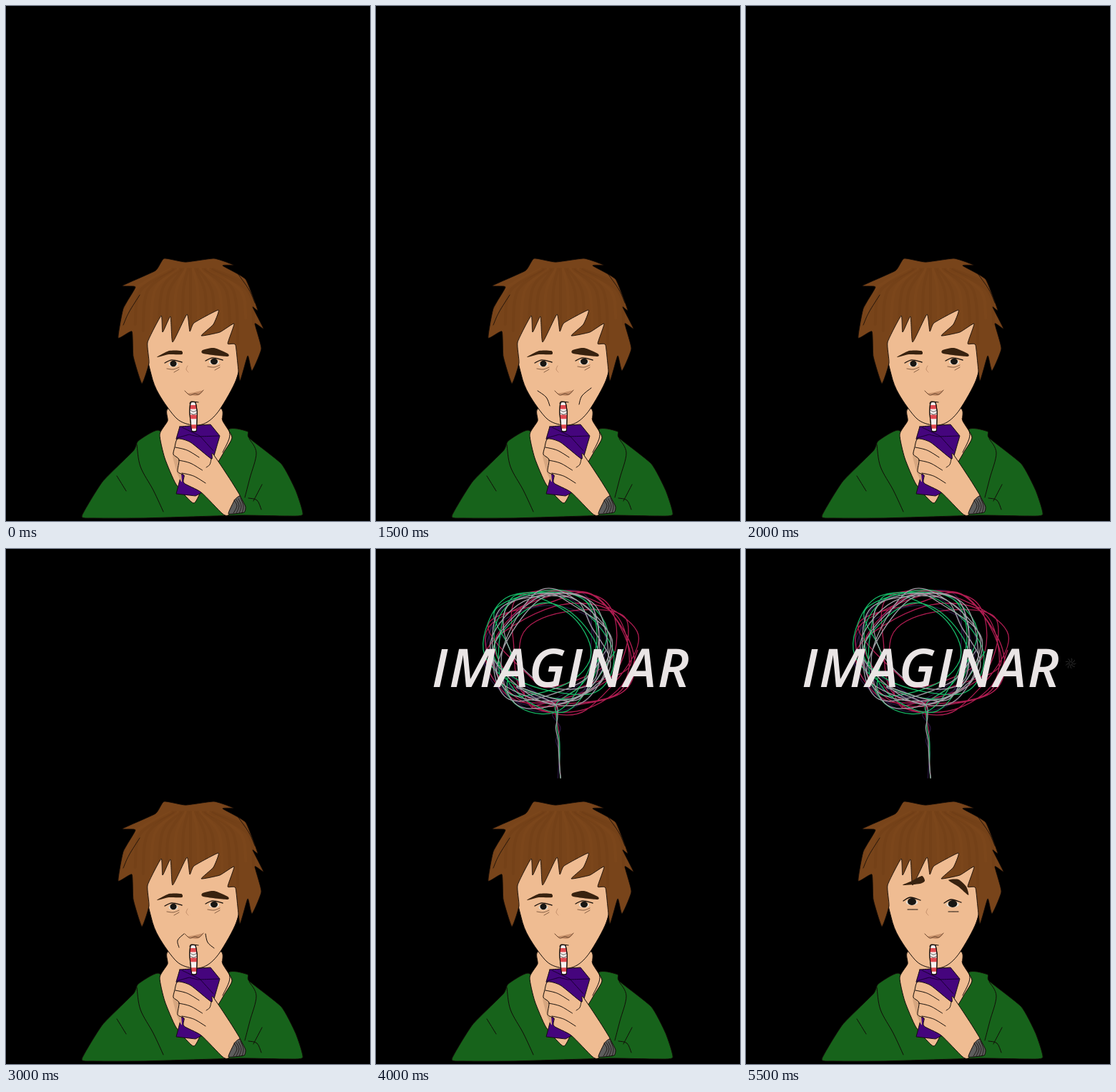
Animation, 509 px wide and 720 px high, one loop 6500 ms. Source, as an HTML page with a canvas:

```html
<!DOCTYPE html>
<html lang="es">
<head>
<meta charset="utf-8">
<title>Imaginar</title>
<style>
html, body { margin: 0; width: 100%; height: 100%; overflow: hidden; background: #000; }
canvas { display: block; width: 509px; height: 720px; }
</style>
</head>
<body>
<canvas id="stage" width="509" height="720" role="img" aria-label="IMAGINAR"></canvas>
<script>
const ctx = document.getElementById('stage').getContext('2d');
const BEAT = 500, LOOP = 13 * BEAT;
const SKIN = '#efbc92', SHADE = '#d6a67f', GREEN = '#17631b', HAIR = '#78441a',
  PURPLE = '#45057d', FOLD = '#17002f', RED = '#e04a50', WHITE = '#f6f0ee',
  BROW = '#38220f', INK = '#120c08';

// He sips for six beats, blows, then has the idea and wakes up
function sceneAt(t) {
  const beat = Math.floor(t / BEAT);
  return {
    cheeks: beat < 6 ? (beat % 2 ? 'in' : '') : beat < 8 ? 'out' : '',
    thought: beat >= 8,
    awake: beat >= 9,
    lowered: beat === 9 || beat === 10,
    spark: beat >= 11
  };
}

function seeded(seed) {
  return () => (seed = seed * 16807 % 2147483647) / 2147483647;
}

const parse = s => s.trim().split(/\s+/).map(p => p.split(',').map(Number));

// Smooth path through points; tension 0 gives straight segments
function trace(pts, tension = 1, close = false) {
  const p = typeof pts === 'string' ? parse(pts) : pts, n = p.length, path = new Path2D();
  const at = i => close ? p[(i + n) % n] : p[Math.max(0, Math.min(n - 1, i))];
  path.moveTo(...p[0]);
  for (let i = 0; i < n - (close ? 0 : 1); i++) {
    const a = at(i - 1), b = at(i), c = at(i + 1), d = at(i + 2), k = tension / 6;
    path.bezierCurveTo(b[0] + (c[0] - a[0]) * k, b[1] + (c[1] - a[1]) * k,
      c[0] - (d[0] - b[0]) * k, c[1] - (d[1] - b[1]) * k, c[0], c[1]);
  }
  if (close) path.closePath();
  return path;
}

function stroke(path, width, color) {
  ctx.lineWidth = width;
  ctx.strokeStyle = color;
  ctx.stroke(path);
}

function ink(pts, width = 1, color = INK, tension = 1) {
  stroke(trace(pts, tension), width, color);
}

function shape(pts, color, tension = 0, edge = 1) {
  const path = trace(pts, tension, true);
  ctx.fillStyle = color;
  ctx.fill(path);
  if (edge) stroke(path, edge, INK);
  return path;
}

function oval(x, y, rx, ry, color) {
  ctx.fillStyle = color;
  ctx.beginPath();
  ctx.ellipse(x, y, rx, ry, 0, 0, 7);
  ctx.fill();
}

function drawBody() {
  shape(`106,713 135,665 178,622 185,608 213,593 250,620 313,591 338,595 340,604
    385,640 405,677 415,711 390,713 330,712 260,714 190,716 122,716`, GREEN, .5);
  shape(`228,562 226,580 215,599 222,632 238,669 262,695 274,676 304,625 316,603
    303,580 299,562`, SKIN, .6);
  ink('183,613 188,644 206,677 220,707');
  ink('340,605 350,625 341,660 334,687');
  ink('155,657 168,678');
  ink('358,669 346,692');
  ink('339,688 351,691 357,704');
  ink('302,577 313,599 303,624');
}

function drawFace(cheeks) {
  shape(`215,405 197,472 203,515 214,543 239,577 262,586 281,582 299,564 322,522
    325,490 312,405`, SKIN, .9);
  if (cheeks === 'in') {
    ink('226,538 238,547 243,559');
    ink('301,534 288,545 284,557');
  }
  if (cheeks === 'out') {
    ink('249,538 240,547 242,557');
    ink('279,538 282,550 291,558');
  }
}

function drawHair() {
  const hair = shape(`190,528 178,490 176,455 157,464 164,423 181,393 163,391 209,370
    221,353 251,358 291,353 318,362 303,363 335,382 352,425 345,421 360,451 348,444
    357,479 344,510 338,489 327,524 321,474 310,472 319,444 299,456 273,461 290,445
    297,425 263,443 257,455 253,431 233,470 230,434 219,456 217,433 198,470 200,499`,
    HAIR, .45, .9);
  ctx.save();
  ctx.clip(hair);
  for (let i = 0; i < 18; i++) {
    const x = 178 + i * 10, lean = (x - 258) * .35;
    ink([[258 + lean, 368], [x, 398], [x + lean * .3, 436 + i % 5 * 9]],
      4, i % 3 ? 'rgba(82,40,12,.1)' : 'rgba(155,88,35,.09)');
  }
  ctx.restore();
  ink('187,404 172,428 164,446', .8);
  ink('324,374 340,397 348,415', .8);
}

function drawEye(x, y, size, awake) {
  const h = awake ? 5 : 4.2;
  oval(x, y + 1, size * 1.4, h * .8, '#e6dfd4');
  oval(x, y, size, h, '#171613');
  ink([[x - 12, y - 1], [x - 2, y - h - 1], [x + 12, y - 2]], 1.3);
  if (awake) {
    ink([[x - 6, y + 11], [x + 8, y + 11]]);
  } else {
    ink([[x - 9, y + 7], [x, y + 8], [x + 8, y + 5]], .8, '#67452e');
    ink([[x + 1, y + 12], [x + 8, y + 8]], .8, '#67452e');
  }
}

function drawEyes(awake) {
  if (awake) {
    shape('219,470 232,464 246,457 250,464 243,468', BROW, .7, 0);
    shape('283,463 297,462 308,472 311,484 297,472', BROW, .7, 0);
    drawEye(232, 493, 6, true);
    drawEye(289, 496, 6.3, true);
  } else {
    shape('211,491 228,482 245,482 246,487 228,487', BROW, .7, 0);
    shape('275,481 291,478 310,486 309,490 276,486', BROW, .7, 0);
    drawEye(234, 500, 4.6, false);
    drawEye(291, 497, 5, false);
  }
}

function drawNose() {
  ink('254,503 252,508 255,512', .8, '#b98562');
  shape('254,542 264,540 275,538 267,545', '#c58f69', .8, 0);
  ink('250,538 257,544 264,542 270,543 276,537', .9, '#583621');
}

function drawStraw(x0, x1, y0, y1) {
  const h = y1 - y0;
  ctx.save();
  ctx.translate(x0, y0);
  ctx.transform(1, 0, (x1 - x0) / h, 1, 0, 0);
  const side = [0, .3, .5, 1].map(k => [3.2 + 2 * Math.sin(Math.PI * k ** .6), h * k]);
  const mirror = side.map(([x, y]) => [-x, y]).reverse();
  const tube = shape([...side, ...mirror], WHITE, .4);
  ctx.save();
  ctx.clip(tube);
  ctx.fillStyle = RED;
  for (let i = 0; i < 3; i++) ctx.fillRect(-9, h * (.1 + i * .34), 18, h * .14);
  ctx.restore();
  stroke(tube, 1, INK);
  for (let i = 0; i < 2; i++) {
    const y = h * .28 + i * 4;
    ink([[-4, y], [0, y + 2], [5, y]], .8, '#333');
  }
  ctx.restore();
}

function drawBracelet() {
  shape('327,685 335,700 333,708 311,710 320,690', '#5d5d5d', .4);
  for (let i = 0; i < 4; i++)
    ink([[319 + i * 3, 691 - i], [323 + i * 3, 699], [318 + i * 4, 709]], .8);
}

function drawFingers(x, y, dx, dy, gap) {
  for (let i = 0; i < 3; i++) {
    const fx = x + i * gap / 4, fy = y + i * gap;
    ink([[fx, fy], [fx + dx * .5, fy + dy * .3], [fx + dx, fy + dy]]);
  }
}

function drawRaised() {
  shape('243,588 286,585 299,601 290,632 278,678 265,685 238,682 249,640 238,605', PURPLE);
  ink('239,604 256,599 268,602 298,601', 1, FOLD, 0);
  ink('246,589 271,601 290,622', 1, FOLD, 0);
  shape('237,607 233,628 239,652 246,665 241,620', SHADE, .6, 0);
  shape(`240,605 258,610 287,633 290,627 328,686 321,697 312,711 303,710 273,680
    249,667 249,656 240,651 242,634 234,627 236,617`, SKIN, .7);
  drawFingers(237, 617, 33, 14, 18);
  ink('287,633 285,641 280,645', .9);
  drawBracelet();
  ink('257,556 259,553 269,554');
  drawStraw(261.5, 263, 554, 594);
}

function drawLowered() {
  ink('257,556 263,557 268,556', 1, '#583621');
  shape(`264,609 253,633 266,669 304,705 312,711 325,687 316,667 320,628 315,603
    300,628`, SKIN, .8);
  shape('264,596 303,587 316,601 304,625 296,634 276,624', PURPLE);
  ink('266,607 284,602 306,606 316,601', .9, FOLD, 0);
  ink('284,602 296,633 306,606', .9, FOLD, 0);
  drawFingers(258, 620, 18, 20, 17);
  drawBracelet();
  drawStraw(277.5, 283, 558, 603);
}

// One thread winds around a cloud, then runs down a thin stem
function drawThread(color, seed, cx, rx, ry, kink, turns) {
  const rnd = seeded(seed), pts = [];
  let a = rnd() * 7;
  for (let i = 0; i < turns; i++) {
    const r = .5 + .5 * Math.sqrt(rnd());
    pts.push([cx + Math.cos(a) * rx * r, 139 + Math.sin(a) * ry * r]);
    a += .65 + rnd() * .9;
  }
  for (let i = 0; i <= 6; i++) {
    const k = i / 6;
    pts.push([252 + 7 * k + (rnd() - .7) * kink * (1 - k * .7), 215 + 105 * k]);
  }
  ink(pts, 1.3, color);
}

function drawThought() {
  drawThread('#29163f', 71, 243, 96, 90, 38, 26);
  drawThread('#ad1c50', 523, 260, 112, 92, 5, 38);
  drawThread('#16b866', 919, 242, 95, 92, 5, 32);
  drawThread('#a09da5', 347, 243, 88, 94, 7, 36);
  ctx.font = 'italic 600 75px "Open Sans", "Noto Sans", sans-serif';
  ctx.letterSpacing = '2px';
  ctx.textAlign = 'center';
  ctx.fillStyle = '#eae5e5';
  ctx.fillText('IMAGINAR', 259, 193);
}

function drawSpark() {
  for (let i = 0; i < 9; i++) {
    const a = i * Math.PI * 2 / 9, c = Math.cos(a), s = Math.sin(a);
    ink([[454 + c * 2, 160 + s * 2], [454 + c * 5 - s, 160 + s * 5 + c], [454 + c * 7, 160 + s * 7]],
      .8, '#3a3a3a');
  }
}

function draw(scene) {
  ctx.fillStyle = '#000';
  ctx.fillRect(0, 0, 509, 720);
  ctx.lineCap = ctx.lineJoin = 'round';
  if (scene.thought) drawThought();
  if (scene.spark) drawSpark();
  drawBody();
  drawFace(scene.cheeks);
  drawHair();
  drawEyes(scene.awake);
  drawNose();
  if (scene.lowered) drawLowered();
  else drawRaised();
}

const start = performance.now();

function tick(now) {
  draw(sceneAt(Math.max(0, now - start) % LOOP));
  requestAnimationFrame(tick);
}
tick(start);
</script>
</body>
</html>
```
